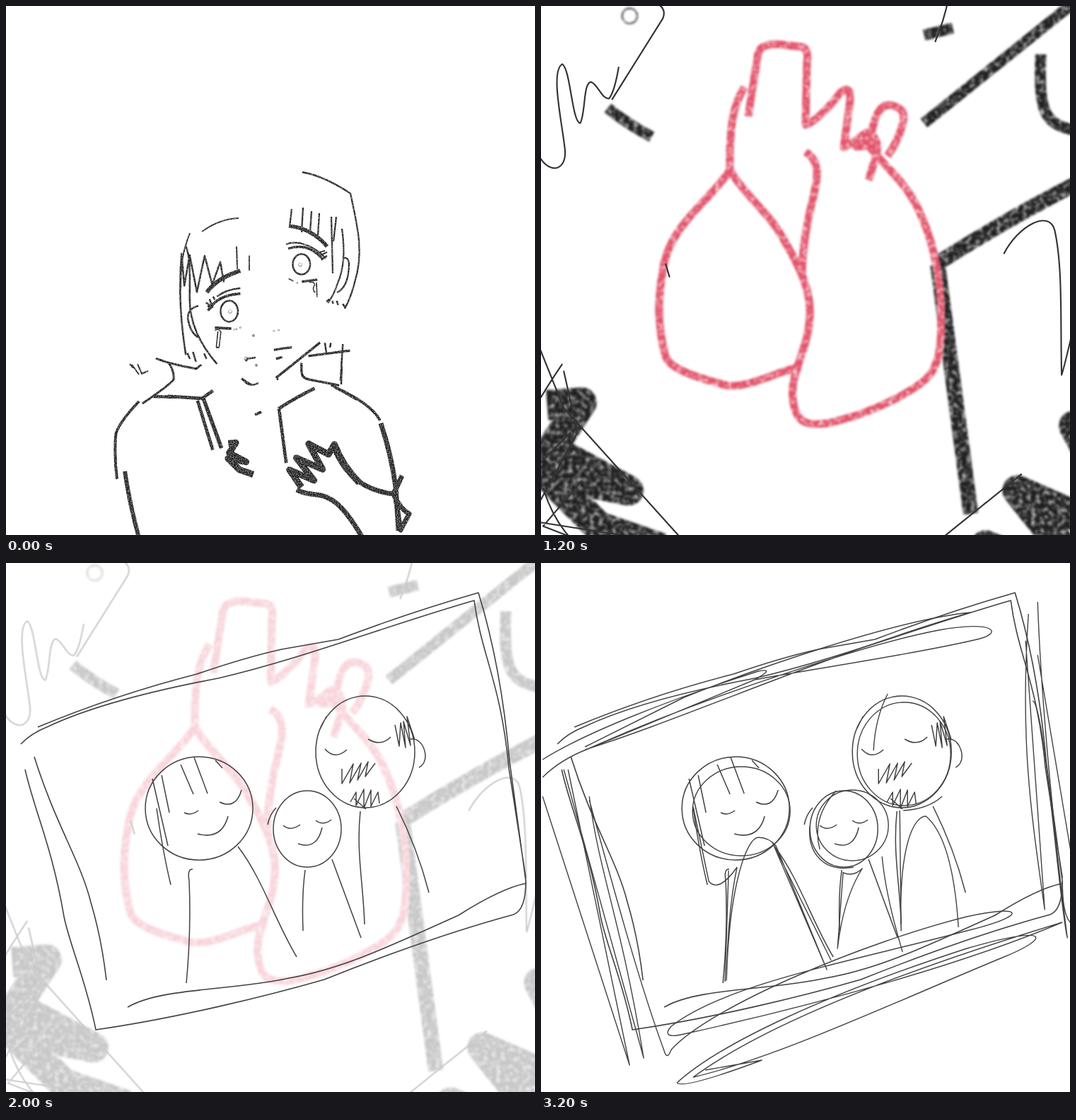
Write an HTML page that moves like this. It is 748 px wide and 748 px high and loops after 3600 ms.

```html
<!DOCTYPE html>
<html lang="en">
<head>
<meta charset="utf-8">
<title>Heart and picture</title>
<style>
html, body { margin: 0; width: 100%; height: 100%; overflow: hidden; background: #fff; }
svg { display: block; width: 100vw; height: 100vh; }
path { fill: none; stroke-linejoin: round; }
</style>
</head>
<body>
<svg id="stage" viewBox="0 0 748 748">
  <defs>
    <filter id="grain" filterUnits="userSpaceOnUse" x="0" y="0" width="800" height="800" color-interpolation-filters="sRGB">
      <feTurbulence type="fractalNoise" baseFrequency="0.75" numOctaves="2" seed="4"/>
      <feColorMatrix values="0 0 0 0 0  0 0 0 0 0  0 0 0 0 0  0 0 0 1.8 -0.03" result="noise"/>
      <feComposite in="SourceGraphic" in2="noise" operator="in"/>
      <feGaussianBlur stdDeviation="0.4"/>
    </filter>
  </defs>
</svg>
<script>
const STEP = 400, COUNT = 9;
const FAR = { scale: 1, x: 0, y: 0 };
const CLOSE = { scale: 2.36, x: -539, y: -869.5 };
const CLOSER = { scale: 4.59, x: -1434.4, y: -2274.2 };
const RIGHT_CLOSE = { scale: 2.36, x: -424, y: -856 };
const NS = "http://www.w3.org/2000/svg";

function node(parent, tag, attrs = {}) {
  const el = document.createElementNS(NS, tag);
  for (const key in attrs) el.setAttribute(key, attrs[key]);
  return parent.appendChild(el);
}
const group = (parent, attrs) => node(parent, "g", attrs);
const draw = (parent, width, ...lines) =>
  node(parent, "path", { d: lines.join(""), "stroke-width": width });
const oval = (x, y, rx, ry) =>
  `M${x - rx} ${y}a${rx} ${ry} 0 1 1 ${2 * rx} 0a${rx} ${ry} 0 1 1 ${-2 * rx} 0`;
const dot = (x, y) => oval(x, y, 0.5, 0.5);
const zoom = ({ scale, x, y }) => `translate(${x} ${y}) scale(${scale})`;
const unzoom = ({ scale, x, y }) => ({ transform: `scale(${1 / scale}) translate(${-x} ${-y})` });
const show = (el, on) => el.setAttribute("display", on ? "inline" : "none");

const all = group(document.getElementById("stage"));
const world = group(all);
const sketch = group(world, { filter: "url(#grain)", stroke: "#1e1e1e" });
const left = group(sketch), right = group(sketch);
const middle = group(sketch);
const leftNear = group(left, unzoom(CLOSE));
const rightNear = group(right, unzoom(RIGHT_CLOSE));
const heart = group(sketch, { ...unzoom(CLOSER), stroke: "#e2536a" });
const scribble = group(world, { ...unzoom(CLOSE), stroke: "#333" });
const picture = group(all, { stroke: "#424242" });
const rough = group(all, { stroke: "#424242" });

// Left half: outer parts
draw(left, 2, "M277 319Q302 301 329 300", "M260 321C249 350 247 365 247 400",
  "M178 507L188 521M186 506L192 520L201 516M175 506L180 512",
  "M326 340L327 372M344 353V374");
draw(left, 4, "M188 559C172 576 156 595 155 608Q153 640 157 669");
draw(left, 6, "M168 658Q175 705 188 752");
draw(left, 4.5, "M208 552L240 553");

// Left half: face, neck, collar and hand
draw(leftNear, 6, "M47 -45C36 90 45 190 61 295", "M60 -70C80 -30 73 50 74 110C74 180 100 250 165 325",
  "M47 -40L56 64L74 -38L98 85L124 -36L149 60L176 -15L188 52",
  "M103 131Q66 140 68 175Q76 220 101 236",
  "M66 288L75 308M85 285L95 318M122 290L130 308",
  "M165 100Q195 76 243 72", "M128 120L152 137M140 108L150 135M152 100L158 111M134 130L146 142",
  oval(206, 149, 29, 35));
draw(leftNear, 4, "M158 213Q170 205 178 218L172 270H163L168 216");
draw(leftNear, 9, "M135 147C160 107 195 94 243 90", "M158 204L213 207");
draw(leftNear, 5, dot(222, 210), dot(230, 209), dot(243, 204));
draw(leftNear, 14, "M131 86Q165 38 243 14");
draw(leftNear, 7, "M-39 306Q0 323 95 341L113 328", "M2 319Q22 345 21 375Q15 390 -84 457");
draw(leftNear, 8, "M247 374Q262 386 279 395");
draw(leftNear, 11, dot(209, 150), dot(263, 307), "M0 433L115 440L152 414", "M100 447L151 612");
draw(leftNear, 13, "M118 436L180 606");
draw(leftNear, 22, "M203 590L228 588L206 622L262 652L202 640L240 678L286 694");

// Pieces between the halves, lost once they part
draw(middle, 2.4, "M338 532Q347 539 357 533", "M340 499L353 497M341 502L338 500", dot(350, 466), dot(354, 508), "M384 526V529");
draw(middle, 4, "M352 578L361 574");

// Right half: outer parts
draw(right, 2.3, "M419 235Q449 240 487 265C498 315 506 350 493 391Q488 411 479 428",
  "M404 287L401 313M420 285L418 320M432 290L430 320M443 293L441 325",
  "M460 298L462 378M467 298L463 333", "M475 315Q482 362 469 392Q464 408 455 420",
  "M476 357Q488 352 484 378Q481 399 468 405",
  "M396 337C415 329 440 343 452 357", "M437 350L451 346M442 354L454 348M446 359L454 353",
  "M475 510L474 535");
draw(right, 3.4, "M399 343Q427 334 447 357");
draw(right, 5.5, "M400 311Q432 314 454 340");
draw(right, 4, "M465 539Q516 562 529 586");
draw(right, 7, "M530 590Q545 635 551 680L555 742",
  "M463 623C480 666 508 685 548 690M548 690L560 664M548 690Q556 710 570 718L558 741L549 684",
  "M411 684C428 694 442 687 456 696Q476 704 503 750");

// Right half: face, neck, collar and hand
draw(rightNear, 6, oval(562, 6, 29, 34), "M700 272L692 395", "M640 268L645 300M660 268L657 284",
  "M645 130L656 122M665 128L668 138M680 128L684 142M700 138L708 150");
draw(rightNear, 4, "M588 66Q604 62 606 74Q596 92 608 100M612 66L614 115", "M519 54L535 62");
draw(rightNear, 5, dot(470, 229), dot(486, 226), dot(548, 68));
draw(rightNear, 11, dot(558, 7), "M485 488Q548 448 606 420", "M487 488L511 669");
draw(rightNear, 8, "M563 64L615 57", "M470 292Q500 286 530 283", "M477 321L498 316",
  "M477 385L624 267", "M562 335C560 380 565 386 590 391L688 410", "M585 312L724 294", "M660 408L748 458");
draw(rightNear, 22, "M562 750L522 692L604 727L545 652L632 690L586 605L652 640L672 607Q700 680 755 735");

// Heart
draw(heart, 11, "M293 156L307 66Q312 53 335 54L370 58Q379 62 376 80L374 168Q392 162 424 122Q438 110 437 134L428 200L465 178",
  "M465 200Q470 140 492 140Q517 143 512 163Q507 188 490 212", "M463 246L474 212Q480 188 462 178Q440 190 446 199L476 196",
  "M288 115C270 140 266 180 267 232C240 275 180 310 172 375C164 420 166 460 176 495C182 515 230 528 265 537C300 538 330 518 367 510",
  "M267 232C290 270 320 290 340 325C370 375 385 410 379 450C375 490 352 520 356 555C360 590 375 594 405 590C450 580 500 560 535 535C565 515 566 480 566 440C565 380 555 330 530 280C505 235 480 225 455 185",
  "M374 206C395 220 392 240 385 270C375 310 370 340 369 380");

// Thin scribbles, left then right
draw(scribble, 1.1,
  "M48 0C5 100 10 210 48 338C20 210 18 110 42 0M45 150C30 200 25 260 48 336L0 314M47 20C32 120 26 230 50 340",
  "M228 0Q236 80 242 160L237 273L283 298Q290 302 287 309L250 368",
  "M101 236L62 155L107 128M170 72L108 157L205 80L135 150L180 98",
  "M160 235L155 279L190 214L170 262L213 200L180 260L222 205L192 255L238 206L205 250L249 198L215 232L248 222",
  "M137 290L134 383C148 342 162 328 174 362C180 385 187 366 193 396C197 422 217 424 216 405C214 385 205 347 214 342C220 346 221 384 227 385C231 378 229 355 235 355C240 357 243 368 248 367Q252 362 255 344",
  "M107 415L172 608L128 382L187 600L115 430L167 595M150 430L215 592L305 692",
  "M0 448C40 445 40 470 45 555C50 575 58 515 67 521C78 540 75 610 87 613C92 605 99 545 107 562C116 645 122 665 132 618C139 590 147 590 150 610L166 665C170 640 180 610 214 560",
  "M215 565L225 610L190 674L305 692M220 610L165 665M200 650C215 700 260 722 303 718L200 678L228 645",
  "M289 487L292 497");
draw(scribble, 1.1,
  "M485 0Q489 95 490 183Q477 191 468 213Q482 225 498 250Q500 290 485 326",
  "M502 40L505 158Q520 80 530 65C533 80 522 145 529 146Q538 85 546 66C549 90 542 157 550 160Q562 142 567 85",
  "M675 0Q670 60 630 115M748 55Q740 120 709 168M748 78Q740 135 718 170",
  "M623 165C640 135 652 142 648 185C649 223 662 205 663 181C680 170 675 228 687 230C696 220 693 180 698 167C710 195 698 225 708 219Q713 200 717 188C725 220 739 215 738 198Q733 160 714 140",
  "M583 285L592 350M620 270L590 390L605 305C622 385 662 402 717 403",
  "M535 480C545 460 568 447 572 463C578 490 576 530 577 568C583 550 595 480 606 478C612 500 600 562 612 563C622 545 630 475 637 475C640 510 638 570 650 568C660 565 668 465 685 460C695 470 690 550 718 556Q740 555 748 535",
  "M548 640L466 706C505 698 525 725 548 748");

// Picture of three people
draw(picture, 1.6,
  "M45 232C110 205 180 180 270 157Q340 133 390 122L470 108Q570 70 668 42C692 120 705 200 712 280L735 450Q735 490 718 497",
  "M21 256Q35 241 60 231C120 203 210 180 300 163C420 135 540 88 662 53C672 130 700 170 711 290L735 445",
  "M718 497Q600 529 450 589C370 612 240 644 127 660C113 590 90 540 82 500C65 400 40 350 27 292",
  "M735 453Q700 460 640 498C530 548 470 575 400 587C320 605 220 600 172 628",
  "M40 274C70 370 105 420 120 480Q135 530 142 590");
draw(picture, 1.5, oval(273, 347, 76, 73),
  "M207 305L229 400M220 300L231 353M247 285L265 327M266 275L285 326M296 279L306 290M213 347Q222 410 233 455",
  "M252 353Q261 358 272 350M302 338Q325 349 333 321M271 383Q305 392 314 358",
  "M264 433Q256 432 259 450Q262 520 255 594M328 401C362 445 380 505 411 557",
  oval(426, 376, 48, 54), "M370 370Q373 355 382 346",
  "M392 371Q402 380 416 370M438 364Q448 372 460 363M413 397Q440 406 447 374",
  "M423 434Q418 470 420 520M461 419L502 530",
  oval(508, 267, 70, 79), "M444 235L453 217",
  "M451 263Q465 279 482 264M512 249Q530 260 544 246M572 249C590 245 602 280 584 289",
  "M475 291V312L491 284L486 311L502 283L497 307L512 281L508 302L522 283",
  "M550 229L556 259L558 226L565 261L562 224L572 258L567 217L578 250",
  "M487 338L495 324V343L506 320V347L516 321V344L526 324L528 340M492 333L509 348",
  "M501 351C495 410 505 450 507 511M552 344Q582 404 598 466");

// Loose second pass over the same picture
draw(rough, 1.4,
  "M0 303Q25 278 64 263L300 165Q330 148 305 153C180 193 60 240 0 278",
  "M60 264C200 220 400 130 605 70C500 80 300 150 200 190L60 260",
  "M66 262C250 180 480 110 560 95C640 80 655 100 610 109C520 130 380 150 300 165",
  "M687 72C675 250 690 350 710 490L683 110M700 55C705 200 725 400 742 530C730 480 710 200 693 195M748 415L700 130M735 450Q735 500 748 510",
  "M0 330L123 710L36 292M30 292L143 700C110 500 80 440 66 330M66 335C95 440 135 590 172 690Q176 704 182 688",
  "M182 688C240 625 460 535 600 500C680 482 690 498 600 520C430 565 260 595 182 655C172 666 176 672 200 666C400 622 600 565 735 508",
  "M190 735C250 680 400 610 600 545C720 510 720 530 650 558C500 620 330 700 213 727C270 685 400 610 735 508M190 735Q200 744 310 703L230 717");
draw(rough, 1.4, oval(281, 351, 69, 63), oval(438, 371, 51, 50), oval(511, 270, 66, 73),
  "M213 345L235 450Q249 467 275 430M263 435L258 592M275 430Q262 490 260 590C264 450 290 388 305 388Q320 388 330 400L402 575L325 395L408 562",
  "M415 322Q380 360 392 405M378 372C374 410 398 438 440 430M425 437L417 545Q425 475 452 432Q440 444 425 438M480 415Q485 470 509 550",
  "M488 185Q470 220 468 265M505 350L507 520C503 400 525 358 542 358Q580 390 588 515M510 350Q545 348 565 330");

function render(ms) {
  const step = Math.floor(ms / STEP) % COUNT;
  const apart = step >= 1, near = step >= 2;
  const drift = Math.max(0, step - 5) * 0.75;
  all.setAttribute("transform", `translate(${drift} 0)`);
  world.setAttribute("transform", zoom(step < 2 ? FAR : step < 3 ? CLOSE : CLOSER));
  world.setAttribute("opacity", step < 4 ? 1 : step < 5 ? 0.6 : 0.25);
  right.setAttribute("transform", apart ? "translate(48.7 5.7)" : "");
  show(world, step < 8);
  show(middle, !apart);
  show(heart, apart);
  show(scribble, near);
  show(picture, step >= 4);
  picture.setAttribute("opacity", step < 5 ? 0.5 : 1);
  show(rough, step === 8);
}

const start = performance.now();
let shown = -1;
function tick() {
  const now = performance.now() - start;
  const step = Math.floor(now / STEP);
  if (step !== shown) render(now);
  shown = step;
  requestAnimationFrame(tick);
}
tick();
</script>
</body>
</html>
```
